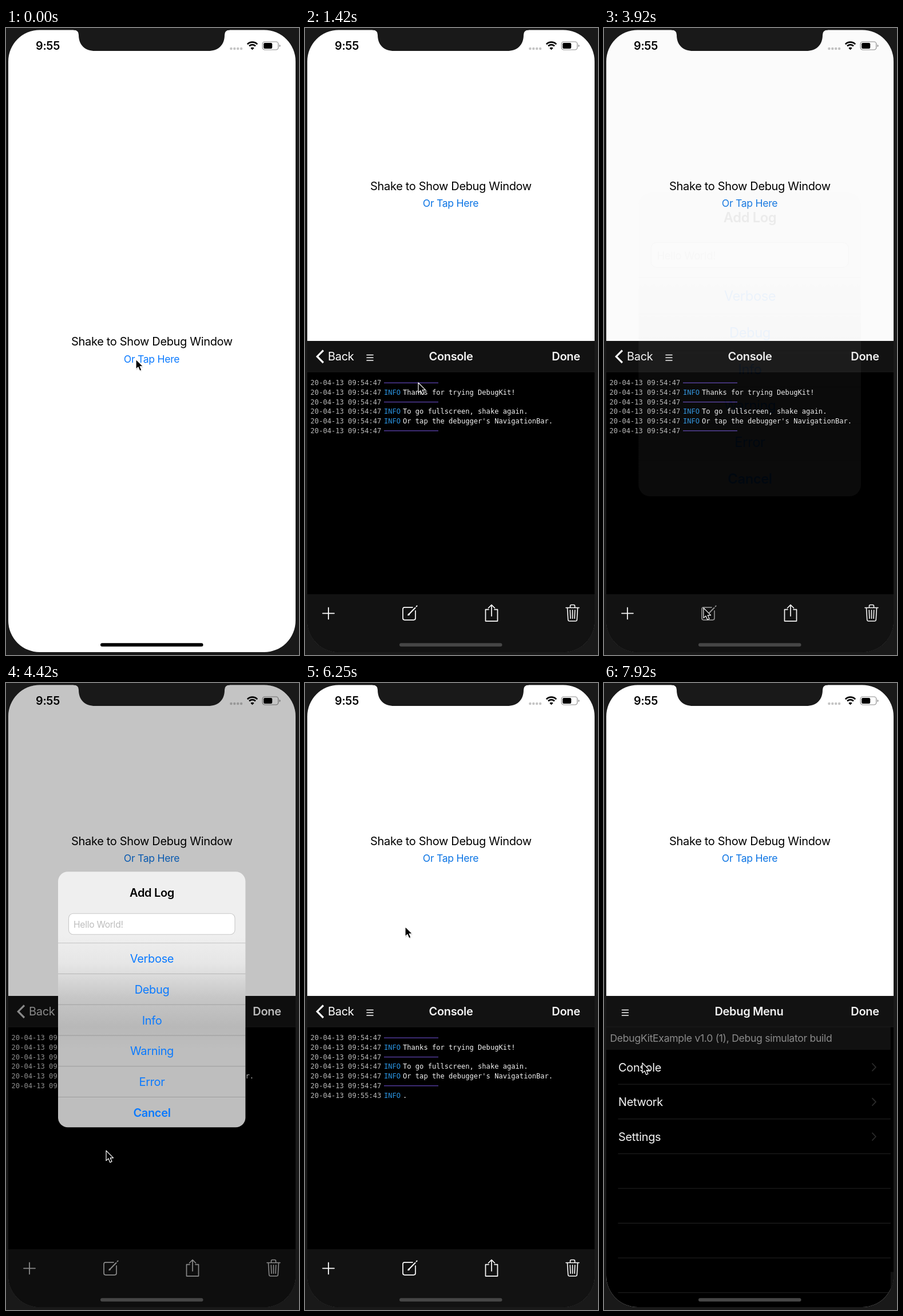
These frames come from a looping animation (512 px wide and 1094 px high, 8000 ms). An HTML page:

```html
<!DOCTYPE html>
<html lang="en">
<head>
<meta charset="utf-8">
<title>Debug console</title>
<style>
  html, body { margin: 0; width: 100%; height: 100%; overflow: hidden; background: #1a1a1a; }
  svg { display: block; width: 100vw; height: 100vh; }
  text { font-family: Inter, Roboto, sans-serif; letter-spacing: -0.017em; white-space: pre; }
  .mono { font: 12.1px "DejaVu Sans Mono", monospace; letter-spacing: 0; }
  .bold { font-weight: 600; }
  .mid { text-anchor: middle; }
  .line { fill: none; stroke: #fff; stroke-linecap: round; stroke-linejoin: round; }
</style>
</head>
<body>
<svg id="stage" viewBox="0 0 512 1094"></svg>
<script>
const LOOP = 8000, FPS = 12, BLUE = '#0a7aff';

const text = (x, y, s, size, fill, cls = '', attrs = '') =>
  `<text x="${x}" y="${y}" font-size="${size}" fill="${fill}" class="${cls}" ${attrs}>${s}</text>`;
const rect = (x, y, w, h, fill, attrs = '') =>
  `<rect x="${x}" y="${y}" width="${w}" height="${h}" fill="${fill}" ${attrs}/>`;
const path = (d, width, attrs = '') => `<path class="line" d="${d}" stroke-width="${width}" ${attrs}/>`;
const group = (id, body, attrs = '') => `<g id="${id}" ${attrs}>${body}</g>`;
const each = (n, f) => Array.from({ length: n }, (_, i) => f(i)).join('');
const burger = x => path(`M${x} 570.5h11M${x} 575.2h11M${x} 580h11`, 1.6);

function app() {
  return group('labels',
    text(255, 554, 'Shake to Show Debug Window', 20, '#000', 'mid') +
    text(254.5, 583.5, 'Or Tap Here', 17.6, BLUE, 'mid', 'id="link"'));
}

function statusBar() {
  const arc = (r, w) => {
    const d = r * 0.72;
    return `<path d="M${430.5 - d} ${37 - d}A${r} ${r} 0 0 1 ${430.5 + d} ${37 - d}" fill="none" stroke="#000" stroke-width="${w}"/>`;
  };
  return text(73, 38, '9:55', 19.8, '#000', 'bold mid') +
    each(4, i => `<circle cx="${393.4 + 5.9 * i}" cy="36" r="2.2" fill="#c4c4c4"/>`) +
    arc(12, 2.7) + arc(7.6, 2.7) + '<path d="M430.5 38.3l-3.2-3.3a4.6 4.6 0 0 1 6.4 0z"/>' +
    rect(448.2, 24, 27.6, 14, 'none', 'rx="4" stroke="#8c8c8c" stroke-width="1.2"') +
    rect(450.2, 26, 15, 10, '#000', 'rx="2.2"') +
    '<path d="M477.6 28.8q2 .8 2 2.2t-2 2.2z" fill="#8c8c8c"/>';
}

function logRow(i, message, time = '09:54:47') {
  const y = 623.2 + 16.72 * i;
  const rest = message
    ? text(138, y, 'INFO', 12.1, '#2a93e0', 'mono') + text(171, y, message, 12.1, '#f2f2f2', 'mono')
    : rect(138, y - 4.7, 95, 1.3, '#5b42ad');
  return `<g id="log${i}">${text(9.6, y, '20-04-13 ' + time, 12.1, '#b8b8b8', 'mono')}${rest}</g>`;
}

function toolbar() {
  return rect(4, 988, 502, 150, '#121212') + group('icons',
    path('M31 1021.3h20M41 1011.3v20', 1.8) +
    group('compose',
      path('M188 1010.8h-14a3 3 0 0 0 -3 3v16a3 3 0 0 0 3 3h16a3 3 0 0 0 3 -3v-13', 1.7) +
      path('M182 1022.5l10.5 -10.8M180.3 1024.3l.8 -1.7 1 1zM194.6 1009.4l1 -1', 2)) +
    path('M321 1014.6h-5.5v20.2h21v-20.2h-5.5M326 1026v-19M320.5 1012l5.5 -5.5 5.5 5.5', 1.7) +
    path('M456 1011.5h23M463.5 1011v-2.5q0 -2 2 -2h4q2 0 2 2v2.5M458.5 1012l1.2 20.5q.2 2.3 2.4 2.3h10.8q2.2 0 2.4 -2.3l1.2 -20.5M463.3 1015.8l.6 14.5M467.5 1015.8v14.5M471.7 1015.8l-.6 14.5', 1.6));
}

function panel() {
  const messages = ['', 'Thanks for trying DebugKit!', '', 'To go fullscreen, shake again.',
    "Or tap the debugger's NavigationBar.", ''];
  const menu = group('menu',
    rect(-160, 600, 690, 40, '#111') +
    text(12, 626, 'DebugKitExample v1.0 (1), Debug simulator build', 17.6, '#8b8b8b') +
    ['Console', 'Network', 'Settings'].map((s, i) =>
      text(26.5, 677.5 + 60.6 * i, s, 20, '#f4f4f4') +
      path(`M470.5 ${664 + 60.6 * i}l6 6.3 -6 6.3`, 1.8, 'style="stroke:#2b2b2b"')).join('') +
    each(7, i => rect(26, 699.6 + 60.6 * i, 486, 1, '#242424')));
  const consoleView = group('console',
    rect(4, 600, 502, 489, '#000') + messages.map((m, i) => logRow(i, m)).join('') +
    logRow(6, '.', '09:55:43') + group('tools', toolbar()));
  const nav = rect(4, 546, 502, 54, '#121212') + rect(4, 599.5, 502, 1, '#1c1c1c') +
    group('consoleNav',
      group('back', path('M32 562.5L21.3 573.2L32 584', 3.2, 'style="stroke-linecap:butt;stroke-linejoin:miter"') +
        text(40, 580.3, 'Back', 20, '#fff') + burger(108)) +
      text(255, 580.3, 'Console', 20, '#f4f4f4', 'bold mid', 'id="consoleTitle"')) +
    group('menuNav', burger(31.5) + text(255, 580.3, 'Debug Menu', 20, '#f4f4f4', 'bold mid', 'id="menuTitle"')) +
    text(456, 580.3, 'Done', 20, '#f4f4f4', 'bold mid');
  return group('panel', rect(4, 546, 502, 560, '#000') + menu + consoleView + nav);
}

function alertBox() {
  const names = ['Verbose', 'Debug', 'Info', 'Warning', 'Error', 'Cancel'];
  return group('alert',
    rect(91, 329.3, 327.4, 446, 'url(#glass)', 'rx="17"') +
    text(255, 372.8, 'Add Log', 20, '#000', 'bold mid') +
    rect(109.5, 402.3, 290.5, 36.5, '#fff', 'rx="8" stroke="#c9c9c9" stroke-width="1.1"') +
    text(118, 427, 'Hello World!', 15.6, '#bdbdbd') +
    names.map((s, i) => rect(91, 453.2 + 53.75 * i, 327.4, 1, '#000', 'opacity=".18"') +
      text(255, 488 + 53.75 * i, s, 20, BLUE, i == 5 ? 'bold mid' : 'mid')).join(''));
}

function keyboard() {
  const key = (x, y, w, s, fill = '#fff', size = 27) =>
    rect(x, y + 1.5, w, 54.5, '#888a8e', 'rx="6"') + rect(x, y, w, 54.5, fill, 'rx="6"') +
    text(x + w / 2, y + (size > 20 ? 35.5 : 33), s, size, '#000', 'mid');
  const row = (letters, x, y) => [...letters].map((c, i) => key(x + 49.95 * i, y, 43, c)).join('');
  const gray = '#abb0ba';
  return group('keyboard', rect(4, 724, 502, 380, '#cccfd6') +
    row('qwertyuiop', 8.5, 733) + row('asdfghjkl', 33.7, 801) + row('zxcvbnm', 83.5, 869) +
    key(8.5, 869, 53, '⇧', gray, 19) + key(448, 869, 53, '⌫', gray, 19) +
    key(8.5, 937, 118, '123', gray, 19) + key(133, 937, 242, 'space', '#fff', 19) +
    key(382, 937, 119, 'return', gray, 19));
}

document.getElementById('stage').innerHTML = `
  <defs>
    <clipPath id="screen"><rect x="4" y="3.4" width="502" height="1085.6" rx="55"/></clipPath>
    <linearGradient id="glass" gradientUnits="userSpaceOnUse" x1="0" x2="0">
      <stop offset="0" stop-color="#efefef"/><stop offset=".25" stop-color="#e6e6e6"/>
      <stop offset=".55" stop-color="#c6c6c6"/><stop offset=".8" stop-color="#b8b8b8"/>
      <stop offset="1" stop-color="#bebebe"/>
    </linearGradient>
  </defs>
  ${rect(0, 0, 512, 1094, '#191919')}
  <g clip-path="url(#screen)">
    ${rect(4, 3, 502, 1087, '#fff')}
    ${statusBar()}${app()}${panel()}
    ${rect(4, 3, 502, 1087, '#000', 'id="dim"')}
    ${alertBox()}${keyboard()}
    ${rect(165, 1073.3, 179.5, 6, '#000', 'rx="3" id="home"')}
  </g>
  <path fill="#191919" d="M118 2V3.4Q127 3.4 127 12C127 30 138 40 156 40H353C371 40 382 30 382 12Q382 3.4 391 3.4V2z"/>
  <g id="cursor">
    <path d="M.5 2v17l4-3.6 2.8 6.2 3-1.3-2.7-6.1h5.6z" opacity=".2"/>
    <path d="M0 0V17.4L4 13.8L6.8 20.4L10 19L7.2 12.6H12.6Z" stroke="#fff" stroke-width="1.2" stroke-linejoin="round"/>
  </g>`;

// Every track is a list of [step, value, ...].
const tracks = {
  cursor: [[0, 227, 578], [1, 227, 573], [2, 227, 578], [7, 227, 578], [11, 220, 598], [16, 198, 619],
    [17, 198, 619], [20, 126, 634], [26, 150, 681], [30, 87, 800], [36, 122, 966], [37, 115, 968],
    [44, 172, 1010], [47, 174, 1012], [48, 174, 995], [53, 175, 816], [58, 175, 421], [66, 175, 422],
    [75, 175, 425], [77, 175, 430], [81, 172, 701], [86, 57, 572], [89, 57, 572], [95, 67, 663]],
  link: [[3, 1], [4, .5], [5, .25], [6, .25], [8, 1]],
  rise: [[6, 0], [7, .06], [8, .32], [9, .65], [10, .87], [11, .97], [12, 1]],
  press: [[43, 1], [44, .55], [47, .55], [49, 1]],
  shade: [[46, 0], [47, .06], [48, .35], [49, .65], [50, .85], [51, .95], [53, 1],
    [64, 1], [65, .75], [66, .39], [67, .15], [68, .03], [69, 0]],
  zoom: [[47, 1.187], [48, 1.125], [49, 1.065], [50, 1.025], [51, 1.008], [53, 1]],
  lift: [[58, 0], [59, .3], [60, .7], [61, .92], [62, 1]],
  keys: [[58, 0], [59, .3], [60, .7], [61, .92], [62, 1], [64, 1], [65, .66], [66, .274], [67, .07], [68, 0]]
};

function at(name, step) {
  const track = tracks[name];
  const i = track.findIndex(p => p[0] > step);
  if (i === 0) return track[0].slice(1);
  if (i < 0) return track[track.length - 1].slice(1);
  const a = track[i - 1], b = track[i], u = (step - a[0]) / (b[0] - a[0]);
  return a.slice(1).map((v, n) => v + (b[n + 1] - v) * u);
}

const set = (id, attrs) => {
  const node = document.getElementById(id);
  for (const name in attrs) node.setAttribute(name, attrs[name]);
};
const shift = (x, y) => `translate(${x} ${y})`;

function draw(step) {
  const value = name => at(name, step)[0];
  const rise = value('rise'), shade = value('shade'), keys = value('keys');
  const drop = 543 * (1 - rise);
  const pop = 1 - Math.pow(1 - Math.min(1, Math.max(0, (step - 88) / 8)), 2.2);
  const lift = -127 * value('lift'), zoom = value('zoom');
  const tint = 1 - .32 * shade;

  set('labels', { transform: shift(0, -271.5 * rise) });
  set('link', { opacity: value('link'), fill: step < 7 ? BLUE : '#0b74e4' });
  set('panel', { transform: shift(0, drop), visibility: rise ? 'visible' : 'hidden' });
  set('log6', { visibility: step > 66 ? 'visible' : 'hidden' });
  set('back', { opacity: step > 86 && step < 89 ? .4 : tint });
  set('icons', { opacity: tint });
  set('compose', { opacity: value('press') });

  set('console', { transform: shift(502 * pop, 0) });
  set('tools', { transform: shift(0, 40 * pop) });
  set('menu', { transform: shift(-150 * (1 - pop), 0) });
  set('consoleNav', { opacity: Math.max(0, 1 - 1.3 * pop) });
  set('consoleTitle', { x: 255 + 200 * pop });
  set('menuNav', { opacity: pop });
  set('menuTitle', { x: 255 - 150 * (1 - pop) });

  set('dim', { opacity: .23 * shade });
  set('alert', {
    opacity: shade,
    transform: `translate(255 ${552 + lift}) scale(${zoom}) translate(-255 -552)`
  });
  set('glass', { y1: 440 - lift, y2: 640 - lift });
  set('keyboard', { transform: shift(0, 365 * (1 - keys)), visibility: keys ? 'visible' : 'hidden' });
  set('home', { fill: rise < .1 || keys > 0 ? '#000' : '#464646' });
  set('cursor', { transform: shift(...at('cursor', step)) });
}

const start = performance.now();
function tick() {
  const time = (performance.now() - start) % LOOP;
  draw(Math.floor((time + 4) * FPS / 1000));
  requestAnimationFrame(tick);
}
draw(0);
requestAnimationFrame(tick);
</script>
</body>
</html>
```
